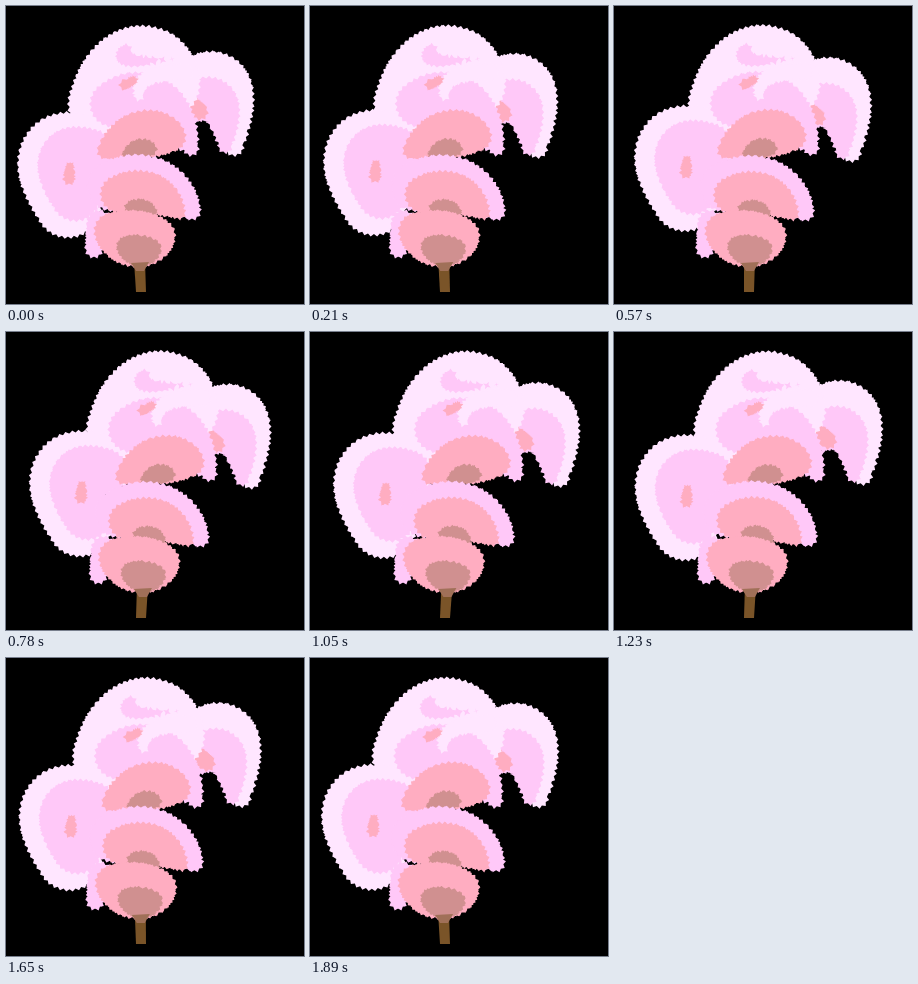
Write an HTML page with a canvas that moves like this. It is 298 px wide and 298 px high and loops after 1920 ms.

```html
<!DOCTYPE html>
<html>
<head>
<meta charset="utf-8">
<style>
html, body { margin: 0; height: 100%; overflow: hidden; background: #000; }
canvas { display: block; }
</style>
</head>
<body>
<canvas id="stage" width="298" height="298"></canvas>
<script>
const ctx = document.getElementById('stage').getContext('2d');
const LOOP = 1920, STEP = 30;
const PALE = '#ffe6ff', LIGHT = '#ffc8f8', PINK = '#ffadc1', DUSK = '#d09090';
const BARK = '#7a5428', KNOT = '#a07058';
const ROOT = { x: 134, y: 265 };

// Round puff with a toothed rim.
function addPuff(path, x, y, r, phase) {
  const n = 2 * Math.max(4, Math.round(r));
  const puff = new Path2D();
  for (let i = 0; i < n; i++) {
    const a = phase + 2 * Math.PI * i / n;
    const rim = r + (i % 2 ? 1 : -1.6);
    puff.lineTo(x + rim * Math.cos(a), y + rim * Math.sin(a));
  }
  puff.closePath();
  path.addPath(puff);
}

// Puffs along a parabola through three keys [x, y, radius].
function arch(color, a, b, c) {
  const path = new Path2D(), steps = 12;
  for (let i = 0; i <= steps; i++) {
    const u = i / steps;
    const [x, y, r] = a.map((v, j) =>
      v * (1 - u) * (1 - 2 * u) + b[j] * 4 * u * (1 - u) + c[j] * u * (2 * u - 1));
    addPuff(path, x, y, r, i * 2.4);
  }
  return { color, path };
}

function spot(color, a, b) {
  return arch(color, a, a.map((v, j) => (v + b[j]) / 2), b);
}

// The same arch repeated, each time shrunk towards an anchor.
function nest(ax, ay, layers, ...keys) {
  return layers.map(([color, s]) =>
    arch(color, ...keys.map(([x, y, r]) => [ax + (x - ax) * s, ay + (y - ay) * s, r * s])));
}

const clusters = [
  { x: 200, y: 85, shapes: [                                  // right
    ...nest(195, 140, [[PALE, 1], [LIGHT, .73]], [185, 82, 26], [218, 82, 28], [228, 140, 10]),
    spot(PINK, [185, 97, 7], [194, 106, 8])
  ]},
  { x: 128, y: 100, shapes: [                                 // crown, back
    arch(PALE, [101, 98, 39], [132, 67, 47], [158, 78, 36]),
    arch(LIGHT, [120, 44, 6], [124, 54, 7], [166, 53, 2])
  ]},
  { x: 63, y: 165, shapes: [                                  // left
    ...nest(92, 165, [[PALE, 1], [LIGHT, .75]], [85, 140, 30], [49, 150, 36], [62, 199, 33]),
    spot(PINK, [64, 160, 4], [63, 173, 6]),
    spot(PINK, [92, 175, 3], [95, 171, 3])
  ]},
  { x: 128, y: 100, shapes: [                                 // crown, front
    arch(LIGHT, [107, 98, 23], [150, 101, 28], [185, 142, 8]),
    arch(PALE, [133, 90, 5], [142, 72, 8], [178, 66, 9]),
    spot(PINK, [118, 79, 5], [128, 74, 4]),
    ...nest(132, 152, [[PINK, 1], [DUSK, .4]], [99, 145, 8], [135, 129, 24], [166, 131, 14])
  ]},
  { x: 145, y: 188, shapes:                                   // middle
    nest(134, 212, [[LIGHT, 1], [PINK, .75], [DUSK, .3]], [106, 180, 25], [150, 180, 27], [186, 205, 9])
  },
  { x: 134, y: 225, shapes: [                                 // base
    spot(LIGHT, [93, 216, 12], [88, 243, 9]),
    ...nest(138, 259, [[PINK, 1], [DUSK, .55]], [106, 225, 18], [132, 233, 28], [156, 228, 13])
  ]}
];

// Zero at the loop start, so the shapes above are the starting pose.
function sway(t, delay) {
  const wave = s => Math.cos(2 * Math.PI * (s - delay) / LOOP);
  return wave(0) - wave(t);
}

function polygon(color, ...points) {
  ctx.fillStyle = color;
  ctx.beginPath();
  for (const [x, y] of points) ctx.lineTo(x, y);
  ctx.fill();
}

function draw(now) {
  const t = Math.floor(now % LOOP / STEP) * STEP;
  ctx.fillStyle = '#000';
  ctx.fillRect(0, 0, 298, 298);

  const top = ROOT.x + 1.7 * sway(t, 40);
  polygon(BARK, [top - 6, 255], [top + 5, 255], [140, 286], [130, 286]);

  // Clusters lean about the root; those further right lag behind.
  for (const { x, y, shapes } of clusters) {
    const side = x - ROOT.x;
    ctx.save();
    ctx.translate(
      .063 * (ROOT.y - y) * sway(t, 40 + 1.2 * side),
      .057 * side * sway(t, -200));
    for (const { color, path } of shapes) {
      ctx.fillStyle = color;
      ctx.fill(path);
    }
    ctx.restore();
  }
  polygon(KNOT, [top - 9, 257], [top + 9, 256], [top + 4, 265], [top - 4, 265]);
}

const start = performance.now();
function tick() {
  draw(performance.now() - start);
  requestAnimationFrame(tick);
}
tick();
</script>
</body>
</html>
```
